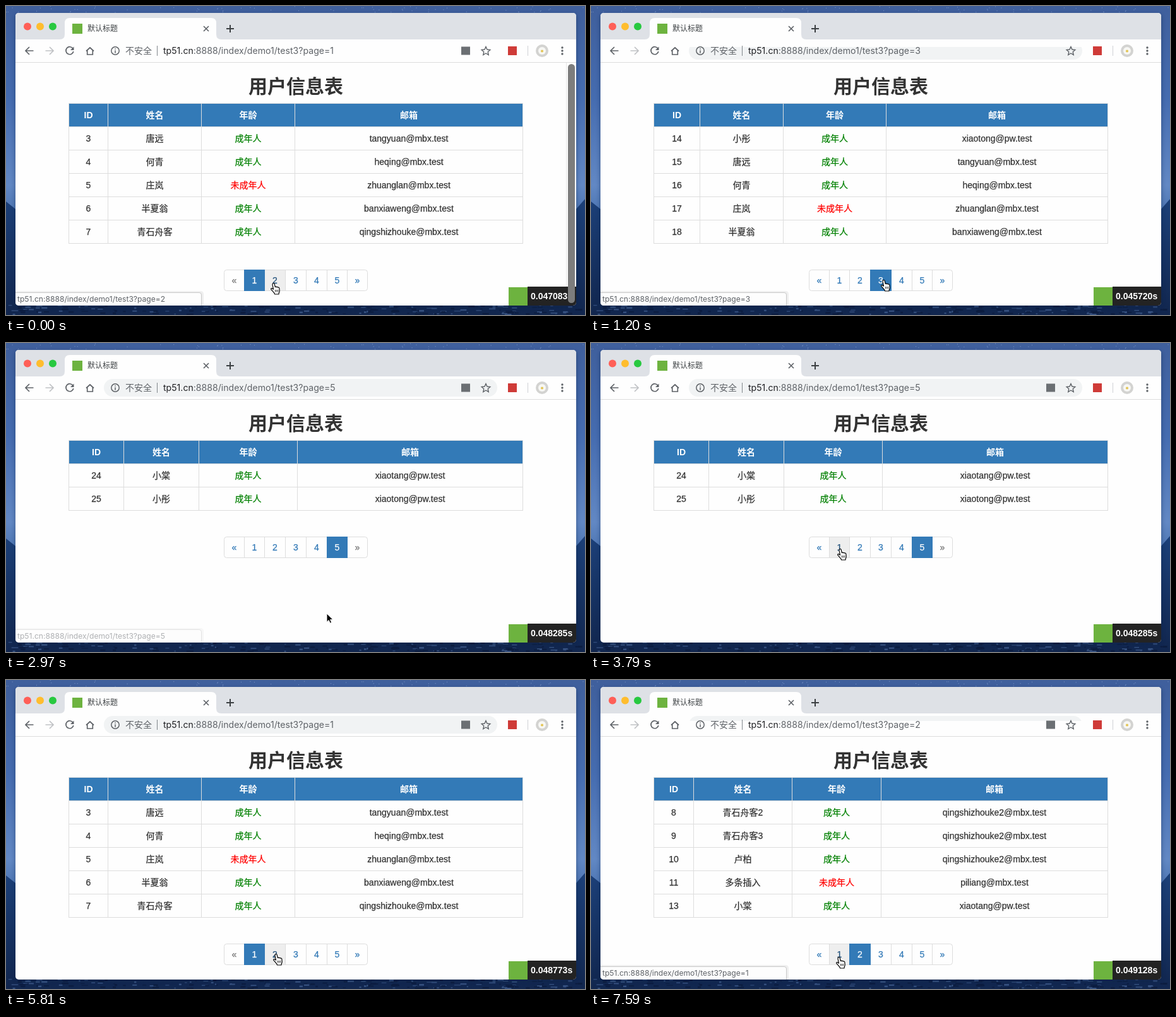
An HTML page that plays this animation: 917 px wide and 490 px high, repeating every 8000 ms.

```html
<!DOCTYPE html>
<html lang="zh-CN">
<head>
<meta charset="utf-8">
<title>默认标题</title>
<style>
html, body { margin: 0; width: 100%; height: 100%; overflow: hidden; }
svg { display: block; width: 917px; height: 490px; }
text { font: 14px "Liberation Sans", "Noto Sans CJK SC", "Noto Sans CJK", sans-serif; color: #333; fill: currentColor; }
.mid { text-anchor: middle; }
.bold { font-weight: bold; }
.ui { font-family: Inter, "Noto Sans CJK SC", "Noto Sans CJK", sans-serif; color: #5f6368; }
.small { font-size: 12px; }
.url { font-size: 14.1px; }
.link { font-size: 12.1px; }
/* heavier strokes, as with macOS font smoothing */
#view text:not(.bold) { stroke: currentColor; stroke-width: .25px; }
.icon { fill: none; stroke: #5f6368; stroke-width: 1.7; }
.grid { fill: none; stroke: #ddd; }
</style>
</head>
<body>
<svg viewBox="0 0 917 490">
  <defs>
    <linearGradient id="sky" x2="0" y2="1">
      <stop offset="0" stop-color="#3f5f9c"/>
      <stop offset=".3" stop-color="#456cb0"/>
      <stop offset=".58" stop-color="#6288c4"/>
      <stop offset=".68" stop-color="#4a73b0"/>
      <stop offset="1" stop-color="#162a50"/>
    </linearGradient>
    <linearGradient id="hill" x2="0" y2="1">
      <stop offset="0" stop-color="#1c4079"/>
      <stop offset="1" stop-color="#11264e"/>
    </linearGradient>
    <clipPath id="frame"><rect x="15" y="11" width="888" height="464" rx="5"/></clipPath>
    <filter id="soft" x="-10%" y="-10%" width="120%" height="120%"><feGaussianBlur stdDeviation="3"/></filter>
  </defs>

  <rect width="917" height="490" fill="url(#sky)"/>
  <path d="M0 310L15 322V470H903V322L917 306V490H0z" fill="url(#hill)"/>
  <g id="specks"></g>
  <rect x="14" y="13" width="890" height="464" rx="6" fill="#0a1a3c" opacity=".35" filter="url(#soft)"/>

  <g clip-path="url(#frame)">
    <rect x="15" y="11" width="888" height="464" fill="#fefefe"/>
    <rect x="15" y="11" width="888" height="42" fill="#dee1e6"/>
    <path d="M85 53q8 0 8-8V27q0-8 8-8H325q8 0 8 8V45q0 8 8 8z" fill="#fefefe"/>
    <path d="M15 89.5H903" stroke="#dcdcdc"/>
    <circle cx="34" cy="32.500" r="6" fill="#ff5f57"/>
    <circle cx="54" cy="32.500" r="6" fill="#ffbd2e"/>
    <circle cx="74" cy="32.500" r="6" fill="#28c940"/>
    <rect x="105" y="28" width="16" height="16" fill="#6db33f"/>
    <text class="ui small" x="129" y="40" style="color:#3c4043">默认标题</text>
    <path class="icon" d="M313 32l8 8m0-8l-8 8"/>
    <path class="icon" d="M349 36h12m-6-6v12" style="stroke:#3c4043;stroke-width:2"/>

    <rect id="pill" x="155" y="57" width="623" height="28" rx="14" fill="#f1f3f4"/>
    <path class="icon" d="M43.500 71H31.500m5.500-6l-6 6 6 6"/>
    <path class="icon" d="M62.500 71h12m-5.500-6l6 6-6 6" style="stroke:#c0c2c5"/>
    <path class="icon" d="M106 67.500a6 6 0 1 0 .8 4.500"/>
    <path d="M107.500 64.500v5.500h-5.500z" fill="#5f6368"/>
    <path class="icon" d="M127 71.500l6-5.500 6 5.500m-10.300-1v6.500h8.600v-6.500"/>
    <circle class="icon" cx="173" cy="71" r="6.200" style="stroke-width:1.500"/>
    <path class="icon" d="M173 67.200v1.600m0 1.400v4.500" style="stroke-width:1.500"/>
    <text class="ui" x="189" y="76">不安全</text>
    <path d="M239.500 63v16" stroke="#80868b"/>
    <text class="ui url" x="249" y="76"><tspan fill="#202124">tp51.cn</tspan><tspan id="url"></tspan></text>
    <rect id="lang" x="721" y="64.500" width="14" height="13" fill="#6b6f73"/>
    <path class="icon" d="M760 64.500l2 4.500 4.800.5-3.600 3.200 1 4.800-4.200-2.500-4.200 2.500 1-4.800-3.600-3.200 4.800-.5z" style="stroke-width:1.400"/>
    <rect x="795" y="64" width="14" height="14" fill="#cf3b38"/>
    <path d="M826.500 63v16" stroke="#d0d2d5"/>
    <circle cx="849" cy="71" r="10" fill="#d3d3d1"/>
    <circle cx="849" cy="71" r="6" fill="#f7f7f4"/>
    <circle cx="849" cy="71.500" r="2" fill="#e3c556"/>
    <g fill="#5f6368"><circle cx="881" cy="66" r="1.700"/><circle cx="881" cy="71" r="1.700"/><circle cx="881" cy="76" r="1.700"/></g>

    <text class="mid bold" x="459" y="138" style="font-size:30px">用户信息表</text>
    <g id="view"></g>
    <path id="track" d="M887.500 90V475" stroke="#e6e6e6"/>
    <rect x="796" y="446" width="30" height="29" fill="#6db33f"/>
    <rect x="826" y="445" width="77" height="30" fill="#232323"/>
    <text class="bold" id="timer" x="831" y="465" style="color:#fff"></text>
    <rect id="thumb" x="890" y="92" width="11" height="379" rx="5.500" fill="#7d7d7d"/>
    <g id="status">
      <path d="M15 452H308q5 0 5 5V475H15z" fill="#000" opacity=".06"/>
      <path d="M14.500 454.500H306q3.500 0 3.500 3.500V476H14.500z" fill="#fdfdfd" stroke="#c8c8c8"/>
      <text class="ui link" id="link" x="18" y="469"></text>
    </g>
  </g>
  <g id="hand">
    <g transform="translate(-1 0)">
      <path d="M3.500 1.200c.9-1.200 2.300-.7 2.600.4l1.200 5c.8-.9 1.900-.6 2.200.3.800-.8 1.900-.5 2.200.4.900-.6 2 0 2.100 1l.4 4.200c.1 1.600-.6 2.700-1 3.600l-.2 1.900H6.400l-.3-1.500C4.600 14.800 2.900 12.600 1 10.600.2 9.600 1 8.400 2.300 8.800l2.200 1.400L3.100 3.400c-.1-.8 0-1.600.4-2.200z" fill="#fff" stroke="#000" stroke-width="1.200" stroke-linejoin="round"/>
      <path d="M7.500 11v3.500m2.100-3.500v3.500m2.100-3.500v3.500" stroke="#000" stroke-width=".8"/>
    </g>
  </g>
  <path id="arrow" d="M0 0V13.500L3.200 10.600 5.300 15.300 7.700 14.300 5.600 9.700H10z" fill="#000" stroke="#fff" stroke-width="1"/>
</svg>

<script>
const $ = id => document.getElementById(id);
const LOOP = 8000, TOP = 154, ROW = 37;
const PATH = ':8888/index/demo1/test3?page=';

const box = '@mbx.test', post = '@pw.test';
// name, mail, under age
const users = [
  ['唐远', 'tangyuan' + box], ['何青', 'heqing' + box], ['庄岚', 'zhuanglan' + box, true],
  ['半夏翁', 'banxiaweng' + box], ['青石舟客', 'qingshizhouke' + box],
  ['青石舟客2', 'qingshizhouke2' + box], ['青石舟客3', 'qingshizhouke2' + box],
  ['卢柏', 'qingshizhouke2' + box], ['多条插入', 'piliang' + box, true],
  ['小棠', 'xiaotang' + post], ['小彤', 'xiaotong' + post]
];
const pages = {
  1: { cols: [99, 161, 309, 457, 818], ids: [3, 4, 5, 6, 7], from: 0 },
  2: { cols: [99, 162, 318, 459, 818], ids: [8, 9, 10, 11, 13], from: 5 },
  3: { cols: [99, 172, 304, 467, 818], ids: [14, 15, 16, 17, 18], from: 10 },
  4: { cols: [99, 162, 318, 459, 818], ids: [19, 20, 21, 22, 23], from: 4 },
  5: { cols: [99, 186, 305, 461, 818], ids: [24, 25], from: 9 }
};
const edges = [345, 377, 409, 442, 475, 508, 540, 572];
const clips = { full: 'none', none: 'inset(28px 0 0 0)', low: 'inset(8px 0 0 0)', strip: 'inset(0 0 20px 0)' };

// Pointer steps from just after one place to another, evenly spread in time
const move = (t0, t1, n, [x0, y0], [x1, y1]) => Array.from({ length: n }, (_, i) => {
  const p = (i + 1) / n, k = p * p * (3 - 2 * p);
  return [t0 + (t1 - t0) * i / (n - 1), { x: x0 + (x1 - x0) * k, y: y0 + (y1 - y0) * k }];
});

const events = [
  [0, { page: 1, time: '0.047083', x: 420, y: 439, hand: 1, link: 2, shown: 1, pill: 'none', lang: 1, bar: 1, row: -1, blank: 0 }],
  [360, { page: 2, time: '0.046512', lang: 0, bar: .7 }],
  [480, { pill: 'full', lang: 1, bar: .35 }],
  [600, { bar: 0 }],
  ...move(600, 840, 3, [420, 439], [460, 434]),
  [840, { link: 3 }],
  [1200, { page: 3, time: '0.045720', pill: 'low', lang: 0 }],
  [1320, { pill: 'full', lang: 1 }],
  ...move(1440, 1680, 3, [460, 434], [490, 437]),
  [1560, { link: 4 }],
  [1790, { page: 4, time: '0.049883', lang: 0 }],
  [1900, { lang: 1 }],
  [2020, { x: 504, y: 436, link: 5 }],
  [2140, { x: 510, y: 435 }],
  [2260, { x: 515, y: 435 }],
  [2620, { page: 5, time: '0.048285', lang: 0 }],
  [2740, { lang: 1, hand: 0 }],
  ...move(2970, 3670, 7, [515, 435], [390, 328]),
  [2970, { shown: .5 }],
  [3085, { shown: 0 }],
  [3660, { hand: 1 }],
  [3790, { x: 391, y: 326 }],
  [4030, { link: 1, shown: 1 }],
  [4390, { page: 1, time: '0.048773', lang: 0, row: 3 }],
  [4510, { lang: 1, hand: 0 }],
  [4740, { x: 389, y: 334, shown: .6 }],
  [4860, { x: 386, y: 342, shown: .18 }],
  [4980, { shown: 0, row: 4 }],
  [5090, { row: -1 }],
  ...move(4980, 5330, 4, [386, 342], [358, 436]),
  ...move(5690, 6170, 5, [358, 436], [545, 430]),
  [5810, { hand: 1 }],
  [6400, { page: 2, time: '0.049128', link: 2, shown: 1, pill: 'strip', lang: 0, blank: 1 }],
  [6520, { lang: 1 }],
  [6880, { shown: .5, blank: 0 }],
  [6990, { shown: 0 }],
  [7350, { shown: 1, link: 1 }],
  ...move(6880, 7590, 7, [545, 430], [389, 439])
].sort((a, b) => a[0] - b[0]);

const text = (x, y, s, color, cls = '') =>
  `<text class="mid ${cls}" x="${x}" y="${y}" style="color:${color}">${s}</text>`;
const rect = (x, y, w, h, fill) => `<rect x="${x}" y="${y}" width="${w}" height="${h}" fill="${fill}"/>`;

// Stars along the top, rocks along the bottom
function specks() {
  let seed = 7, out = '';
  const rnd = () => (seed = seed * 16807 % 2147483647) / 2147483647;
  for (let i = 0; i < 70; i++) out += rect(rnd() * 917, rnd() * 10, 1, 1, '#7f98c8');
  for (let i = 0; i < 180; i++) {
    out += rect(rnd() * 917, 474 + rnd() * 14, 2 + rnd() * 9, 1 + rnd() * 2, rnd() < .45 ? '#35507f' : '#0c1d40');
  }
  return out;
}

function table(s) {
  const { cols, ids, from } = pages[s.page];
  const center = i => (cols[i] + cols[i + 1] + 1) / 2;
  const end = TOP + ROW * (ids.length + 1);
  let out = rect(99, TOP, 720, ROW, '#337ab7');
  if (s.row >= 0) out += rect(99, TOP + ROW * (s.row + 1), 720, ROW, '#f3f3f3');
  let d = '';
  for (let y = TOP; y <= end; y += ROW) d += `M99 ${y + .5}H819`;
  for (const x of cols) d += `M${x + .5} ${TOP}V${end + 1}`;
  out += `<path class="grid" d="${d}"/>`;
  ['ID', '姓名', '年龄', '邮箱'].forEach((h, i) => out += text(center(i), TOP + 24, h, '#fff', 'bold'));
  ids.forEach((id, r) => {
    const [name, mail, young] = users[(from + r) % users.length];
    const y = TOP + ROW * (r + 1) + 24;
    out += text(center(0), y, id, '#333') + text(center(1), y, name, '#333')
      + text(center(2), y, young ? '未成年人' : '成年人', young ? '#f00' : '#008000')
      + text(center(3), y, mail, '#333');
  });
  return out;
}

function pager(s) {
  const top = TOP + ROW * (pages[s.page].ids.length + 1) + 42;
  const tip = s.x + (s.hand ? 4 : 0);
  let fills = '', lines = '', labels = '';
  ['«', 1, 2, 3, 4, 5, '»'].forEach((label, i) => {
    const a = edges[i], b = edges[i + 1];
    const active = label === s.page;
    const off = (i === 0 && s.page === 1) || (i === 6 && s.page === 5);
    const blank = i === 6 && s.blank;
    const over = !active && !off && !blank && tip >= a && tip < b && s.y >= top && s.y < top + 34;
    if (over) fills += rect(a, top, b - a, 34, '#eee');
    if (i) lines += `M${a + .5} ${top}v34`;
    if (active) labels += rect(a, top, b - a + 1, 34, '#337ab7');
    if (!blank) labels += text((a + b + 1) / 2, top + 22, label, active ? '#fff' : off ? '#777' : over ? '#23527c' : '#337ab7');
  });
  return fills + `<rect class="grid" x="345.5" y="${top + .5}" width="227" height="33" rx="4"/>`
    + `<path class="grid" d="${lines}"/>` + labels;
}

function render(s) {
  $('view').innerHTML = table(s) + pager(s);
  $('url').textContent = PATH + s.page;
  $('link').textContent = 'tp51.cn' + PATH + s.link;
  $('timer').textContent = s.time + 's';
  $('status').style.opacity = s.shown;
  $('track').style.opacity = $('thumb').style.opacity = s.bar;
  $('lang').style.opacity = s.lang;
  $('pill').style.clipPath = clips[s.pill];
  for (const [id, on] of [['hand', s.hand], ['arrow', !s.hand]]) {
    $(id).style.display = on ? '' : 'none';
    $(id).setAttribute('transform', `translate(${Math.round(s.x)} ${Math.round(s.y)})`);
  }
}

$('specks').innerHTML = specks();
let last = 0;
function tick() {
  const t = performance.now() % LOOP;
  const past = events.filter(e => e[0] <= t);
  if (past.length !== last) {
    last = past.length;
    render(Object.assign({}, ...past.map(e => e[1])));
  }
  requestAnimationFrame(tick);
}
tick();
</script>
</body>
</html>
```
